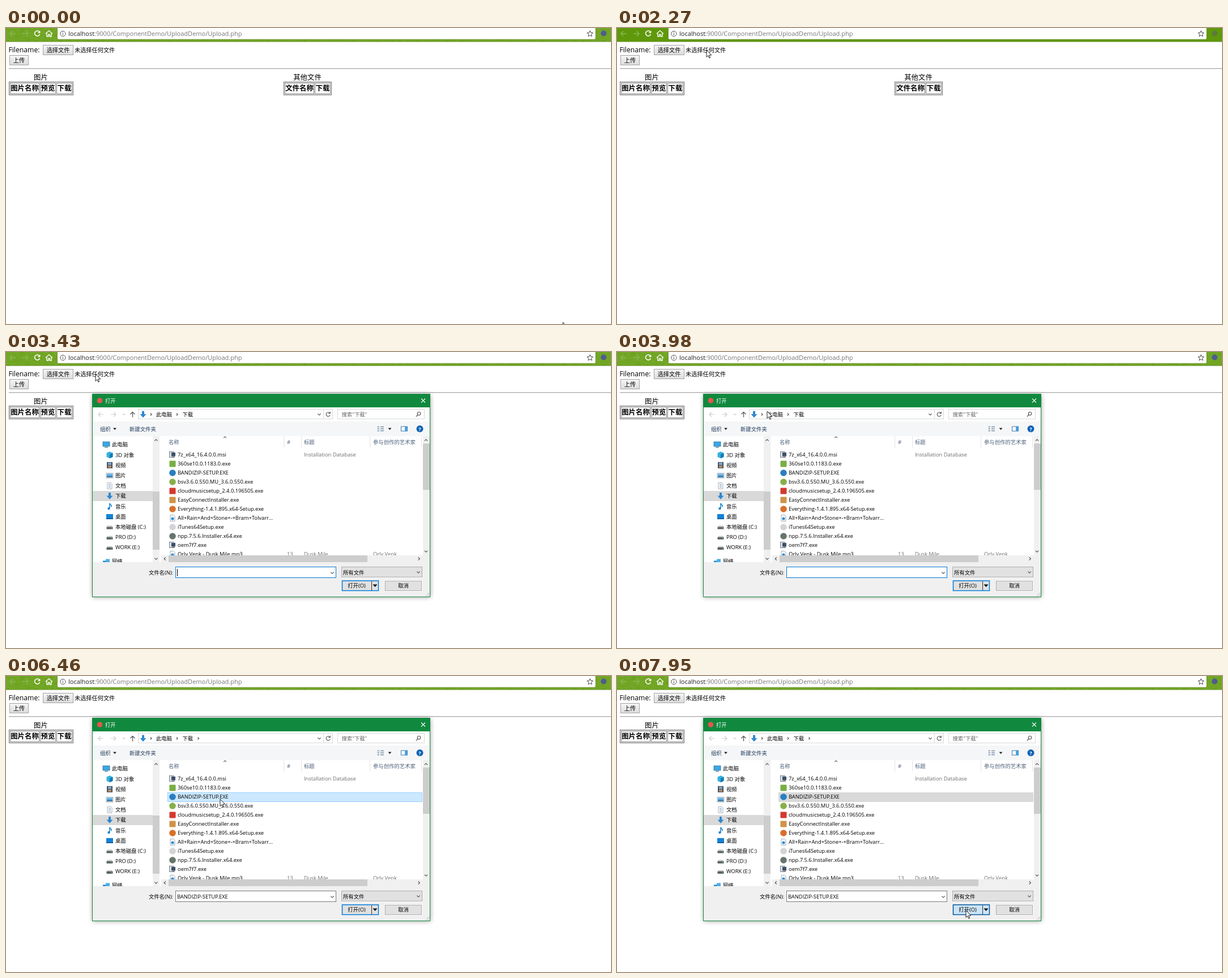
Animation, 1068 px wide and 524 px high, one loop 8000 ms. Source, as an HTML page:

```html
<!DOCTYPE html>
<html lang="zh-CN">
<head>
<meta charset="utf-8">
<title>Upload</title>
<style>
  html, body { margin: 0; width: 100%; height: 100%; overflow: hidden; background: #fff; }
  svg { display: block; width: 1068px; height: 524px; }
  text { font-family: "Open Sans", "Noto Sans CJK SC", "Noto Sans CJK JP", "Noto Sans CJK", sans-serif; white-space: pre; }
</style>
</head>
<body>
<svg viewBox="0 0 1068 524"></svg>
<script>
const LOOP = 8000;
const BLUE = '#0078d7', GREEN = '#10893e', UI = 9.35;

// Markup helpers
const rect = (x, y, w, h, fill, stroke = 'none', more = '') =>
  `<rect x="${x}" y="${y}" width="${w}" height="${h}" fill="${fill}" stroke="${stroke}" ${more}/>`;
const box = (x, y, w, h, fill, stroke, more) => rect(x + .5, y + .5, w - 1, h - 1, fill, stroke, more);
const text = (x, y, s, size = UI, fill = '#000', more = '') =>
  `<text x="${x}" y="${y + size * .36}" font-size="${size}" fill="${fill}" ${more}>${s}</text>`;
const mid = (x, y, s, size, fill, more = '') => text(x, y, s, size, fill, `text-anchor="middle" ${more}`);
const end = (x, y, s, size, fill, more = '') => text(x, y, s, size, fill, `text-anchor="end" ${more}`);
const line = (d, stroke, w = 1, more = '') =>
  `<path d="${d}" fill="none" stroke="${stroke}" stroke-width="${w}" ${more}/>`;
const shape = (d, fill, more = '') => `<path d="${d}" fill="${fill}" ${more}/>`;
const disc = (x, y, r, fill, more = '') => `<circle cx="${x}" cy="${y}" r="${r}" fill="${fill}" ${more}/>`;
const group = (id, body, more = '') => `<g id="${id}" ${more}>${body}</g>`;
const at = (x, y, body) => `<g transform="translate(${x} ${y})">${body}</g>`;
const chevron = (x, y, dir, size = 2.6, color = '#444') =>
  at(x, y, line(`M${-size} ${size / 2}L0 ${-size / 2}L${size} ${size / 2}`, color, 1.1,
    `transform="rotate(${{ up: 0, right: 90, down: 180, left: 270 }[dir]})"`));
const caretDown = (x, y) => shape(`M${x - 3} ${y - 1.5}h6l-3 3.4z`, '#222');

const page = () => `<path d="M-4-5.5H2L4-3.5V5.5H-4Z" fill="#fff" stroke="#8a99a8" stroke-width=".8"/>`;
const icons = {
  pc: rect(-6, -5, 12, 8, '#3ba7e4', '#2b6f9c', 'stroke-width=".8"') + rect(-3, 4, 6, 1.3, '#5a7c92'),
  cube: shape('M0-6L5.5-3.5V3.5L0 6L-5.5 3.5V-3.5Z', '#35b1dc') + shape('M0-1L5.5-3.5V3.5L0 6Z', '#1679b5'),
  film: rect(-5, -5.5, 10, 11, '#45505c') + rect(-3, -4.5, 6, 4, '#7fa8d0') + rect(-3, .5, 6, 4, '#b48a63'),
  picture: rect(-6, -4, 12, 8.5, '#fff', '#8b98a3', 'stroke-width=".8"') + rect(-5, -3, 10, 3.5, '#5fb0e6') + rect(-5, .5, 10, 3, '#3c7fae'),
  page: page() + line('M-2-2.5H2M-2 0H2M-2 2.5H2', '#6b8fb3', .9),
  down: shape('M-2-6H2V-.5H5.5L0 5.8L-5.5-.5H-2Z', '#2f87d0'),
  note: line('M0 3.5V-5.5C1-3 4-3 3 1', '#1c84cf', 1.6) + disc(-1.5, 3.8, 2.2, '#1c84cf'),
  desk: rect(-6, -4.5, 12, 9, '#1683d6') + rect(-6, 3, 12, 1.5, '#0b5796'),
  disk: rect(-5.5, 0, 11, 4, '#5b6065') + shape('M-5.5 0L-4-2H4L5.5 0Z', '#b9bec2') + rect(2.5, 1.5, 1.6, 1.2, '#6ed46a'),
  net: rect(-6, -1.5, 6, 5, '#2487c9') + rect(-1, -4.5, 7, 5.5, '#49aee6'),
  setup: rect(-5.5, -5.5, 7.5, 10, '#d9dee4', '#5e6a77', 'stroke-width=".8"') + rect(-2, -4, 7, 6.5, '#3c4f68') + rect(-1, 3.3, 5, 1.5, '#777'),
  audio: page() + disc(0, 1, 2.6, '#2d8fd5')
};
const icon = (name, x, y) => at(x, y, icons[name]);
const badge = (color, round) => round ? disc(0, 0, 5.8, color) : rect(-5.5, -5.5, 11, 11, color, 'none', 'rx="1"');

// Browser window
function browser() {
  const nav = (x, flip) => line(`M${x - 5} 10H${x + 5}M${x + flip} 5.5L${x + flip * 5} 10L${x + flip} 14.5`, '#8db653', 1.5);
  return rect(0, 0, 1068, 524, '#fff') +
    `<rect id="bar" width="1068" height="24"/>` + rect(0, 0, 1068, 24, '#000', 'none', 'filter="url(#grain)"') +
    line('M0 24.2H1068', '#5c8420', .8) + nav(12, -1) + nav(34, 1) +
    group('reload', line('M59.2 7.2A4.6 4.6 0 1 0 59.6 11', '#fff', 1.6) + shape('M60.4 4.4V9H55.8Z', '#fff')) +
    group('stop', line('M51 6L59 14M59 6L51 14', '#fff', 1.7)) +
    line('M70 10.2L76 4.6L82 10.2M72 9.5V15H74.8V11.5H77.2V15H80V9.5', '#fff', 1.4) +
    rect(90.5, -3, 950.5, 23.2, '#fff', '#5d8a1d', 'rx="2" stroke-width=".8"') +
    line('M105 10A4.6 4.6 0 1 1 104.99 9.8M100.4 9.3V12.6M100.4 7.1V8.3', '#444', 1) +
    text(110, 10, 'localhost<tspan fill="#777">:9000/ComponentDemo/UploadDemo/Upload.php</tspan>', 11, '#222') +
    line('M1031 4.8L1032.5 8.3L1036.2 8.6L1033.4 11.1L1034.2 14.8L1031 12.8L1027.8 14.8L1028.6 11.1L1025.8 8.6L1029.5 8.3Z', '#444', 1) +
    disc(1055, 9.5, 5, '#4f5b93', 'id="ext"');
}

function table(x, widths, labels, title, cx) {
  let left = x + 2, cells = '';
  widths.forEach((w, i) => {
    cells += box(left, 97, w, 20, 'none', '#707070', 'stroke-width=".9"') +
      mid(left + w / 2, 107, labels[i], 12.4, '#000', 'font-weight="700"');
    left += w + 1;
  });
  return mid(cx, 87.5, title, 12.4) + box(x, 95, left + 1 - x, 24, 'none', '#606060', 'stroke-width=".9"') + cells;
}

const pageBody = () => text(4.5, 39, 'Filename:', 12.2) +
  box(65, 30, 54, 18, 'url(#face)', '#a3a3a3', 'id="pick"') + mid(92, 39.5, '选择文件', 10.2) +
  text(121, 39.5, '未选择任何文件', 10.2) +
  box(6, 48, 34, 18, 'url(#face)', '#a3a3a3') + mid(23, 57.3, '上传', 10.2) +
  box(64, 29, 195, 20, 'none', '#e8a33d', 'id="ring"') +
  line('M5 71.8H1068', '#8d8d8d', 1) +
  table(5, [52, 28, 28], ['图片名称', '预览', '下载'], '图片', 61.5) +
  table(490, [52, 28], ['文件名称', '下载'], '其他文件', 532);

// Context menu
function menu() {
  const rows = [
    [127, '返回(B)', 'Alt+向左箭头', 1], [144.3, '前进(F)', 'Alt+向右箭头', 1], [161.5, '重新加载(R)', 'Ctrl+R'],
    [187.5, '另存为(A)...', 'Ctrl+S'], [205, '打印(P)...', 'Ctrl+P'], [222.5, '投射(C)...'], [240, '翻成中文（简体）(T)'],
    [265.5, '保存网页'], [283, 'TidyPane'], [309, '查看网页源代码(V)', 'Ctrl+U'], [326.5, '检查(N)', 'Ctrl+Shift+I']
  ];
  return rect(279, 119, 200.5, 219, '#000', 'none', 'opacity=".5" filter="url(#soft)"') +
    box(275, 115, 203, 222, '#fff', '#b4b4b4') + rect(276, 152, 201, 17.5, '#ebebeb', 'none', 'id="menuHover"') +
    line('M276 173.5H477M276 251.5H477M276 295H477', '#e6e6e6') +
    rows.map(([y, label, key, off], i) => text(302.5, y, label, UI, off ? '#8c8c8c' : '#000') +
      (key ? end(458, y, key, UI, '#929292', i === 2 ? 'id="reloadKey"' : '') : '')).join('') +
    rect(283, 259.5, 12, 12, '#2f8be0', 'none', 'rx="2"') + disc(289, 283, 6, '#c0392b') +
    shape('M468 280L472 283L468 286Z', '#444');
}

// File dialog
const files = [
  ['7z_x64_16.4.0.0.msi', 'setup'], ['360se10.0.1183.0.exe', '#79ad45'], ['BANDIZIP-SETUP.EXE', '#2a7fc0', 1],
  ['bsv3.6.0.550.MU_3.6.0.550.exe', '#86b04a', 1], ['cloudmusicsetup_2.4.0.196505.exe', '#d5392e'],
  ['EasyConnectInstaller.exe', '#cf9347'], ['Everything-1.4.1.895.x64-Setup.exe', '#d8702a', 1],
  ['All+Rain+And+Stone+-+Bram+Tolvarr...', 'audio'], ['iTunes64Setup.exe', '#d4d4d6', 1],
  ['npp.7.5.6.Installer.x64.exe', '#67756c', 1], ['oem7f7.exe', 'setup'], ['Orly Venk - Dusk Mile.mp3', 'audio']
];
const places = [
  ['此电脑', 'pc'], ['3D 对象', 'cube'], ['视频', 'film'], ['图片', 'picture'], ['文档', 'page'], ['下载', 'down'],
  ['音乐', 'note'], ['桌面', 'desk'], ['本地磁盘 (C:)', 'disk'], ['PRO (D:)', 'disk'], ['WORK (E:)', 'disk'], ['网络', 'net']
];
const rowTop = i => 174 + 16 * i;

const frame = () => rect(153, 76, 596, 358, '#000', 'none', 'opacity=".4" filter="url(#blur)"') +
  box(152, 74, 597, 360, '#fff', GREEN) + rect(152, 74, 597, 24, GREEN) +
  disc(165.5, 86, 4.8, '#e2574c') + text(175, 86.3, '打开', UI, '#fff') +
  line('M733 82.5L740 89.5M740 82.5L733 89.5', '#fff', 1.1) +
  rect(153, 372, 595, 61, '#f0f0f0') +
  rect(736, 149, 12, 211, '#f0f0f0') + rect(736, 162, 12, 82, '#cdcdcd') +
  rect(274, 360, 474, 12, '#f0f0f0') + rect(287, 360, 351, 12, '#cdcdcd') +
  rect(299, 380, 284, 20, '#fff') + rect(592, 380, 143, 20, '#fff') +
  rect(593, 404, 66, 20, '#fff') + rect(669, 404, 66, 20, '#fff');

function toolbar() {
  return line('M163 110.5H172M167 106.5L163 110.5L167 114.5M185 110.5H194M190 106.5L194 110.5L190 114.5', '#cfcfcf', 1.2) +
    chevron(208, 110.5, 'down', 2, '#ccc') +
    line('M223.5 115.5V106.5M219.5 110.3L223.5 106.3L227.5 110.3', '#555', 1.3) +
    box(233, 101, 344, 18, '#fff', '#d9d9d9') + line('M560.5 102V118', '#d9d9d9') +
    icon('down', 242, 110.5) + chevron(256, 110.5, 'right', 2) + text(265, 110.5, '此电脑') +
    chevron(302, 110.5, 'right', 2) + text(311.5, 110.5, '下载') +
    group('crumbEnd', chevron(339.5, 110.5, 'right', 2)) + chevron(553, 110.5, 'down') +
    line('M571.5 108A3.6 3.6 0 1 0 572.2 111.5M572.3 105.6V108.6H569.3', '#555', 1.1) +
    box(585, 101, 154, 18, '#fff', '#d9d9d9') + text(592.5, 110.5, '搜索"下载"', UI, '#666') +
    disc(729, 109, 2.8, 'none', 'stroke="#555" stroke-width="1.1"') + line('M727 111.2L723.8 114.4', '#555', 1.3) +
    rect(153, 123, 595, 26, '#f5f6f7') + text(166, 136.3, '组织', UI, '#1e395b') + caretDown(192, 136) +
    text(218, 136.3, '新建文件夹', UI, '#1e395b') +
    line('M655.5 132.5H659M655.5 136H659M655.5 139.5H659M661 132.5H667M661 136H667M661 139.5H667', '#7890a8', 1.6) +
    caretDown(677.5, 136) + rect(697.5, 132, 11, 8, '#fff', '#3b78ad') + rect(704, 132, 4.5, 8, '#4b9fe0') +
    disc(730.5, 136, 6, '#0b62b5') + mid(730.5, 136.2, '?', 9.5, '#fff', 'font-weight="700"');
}

function sidebar() {
  return `<g clip-path="url(#sideClip)">` + rect(153, 246, 106, 18, '#d9d9d9') +
    places.map(([name, kind], i) => {
      const root = i === 0 || i === 11, y = i === 11 ? 371 : 164 + 18.2 * i;
      return icon(kind, root ? 177 : 183, y) + text(root ? 187 : 193, y, name);
    }).join('') + '</g>' +
    rect(259, 149, 12, 223, '#f0f0f0') + rect(259, 247, 12, 103, '#cdcdcd') +
    chevron(265, 156, 'up') + chevron(265, 366, 'down');
}

function list() {
  const head = [[287, '名称'], [496, '#'], [526, '标题'], [648, '参与创作的艺术家']];
  const grey = (x, i, s) => text(x, rowTop(i) + 8, s, UI, '#6d6d6d');
  return line('M490.5 149V169M521.5 149V169M642.5 149V169M733.5 149V169', '#e3e3e3') +
    head.map(([x, s]) => text(x, 159.5, s, UI, '#4c607a')).join('') + chevron(386.5, 151, 'up', 2.4, '#666') +
    `<g clip-path="url(#listClip)">` + rect(285, 174, 450, 16, '#e5f3ff', 'none', 'id="hover"') +
    box(285, rowTop(2), 450, 17, '#cce8ff', '#99d1ff', 'id="picked"') +
    files.map(([name, look, round], i) => {
      const y = rowTop(i) + 8;
      return at(294, y, icons[look] || badge(look, round)) + text(303, y, name);
    }).join('') +
    grey(526, 0, 'Installation Database') + grey(496, 11, '13') + grey(526, 11, 'Dusk Mile') + grey(648, 11, 'Orly Venk') + '</g>' +
    chevron(741.5, 156, 'up') + chevron(741.5, 353, 'down') + chevron(280.5, 366, 'left') + chevron(729, 366, 'right');
}

const footer = () => end(295, 390.5, '文件名(N):') + box(299, 380, 284, 20, '#fff', BLUE, 'id="field"') +
  rect(302, 384, 1, 13, '#000', 'none', 'id="caret"') + text(302, 390.5, files[2][0], UI, '#000', 'id="chosen"') +
  chevron(576, 391, 'down') +
  box(592, 380, 143, 19, '#e1e1e1', '#adadad') + text(595, 390.3, '所有文件') + chevron(728, 390, 'down') +
  rect(593.5, 405, 64, 17.5, '#e1e1e1', BLUE, 'id="open" stroke-width="1.5"') +
  line('M645.5 406V422', '#333', 1) + mid(619, 414, '打开(O)') + shape('M647.5 411.5h8l-4 4.6z', '#000') +
  box(669, 405, 65, 18, '#e1e1e1', '#adadad') + mid(701.5, 414, '取消') +
  line('M746 426V432M743.5 428.5V432M741 431V432', '#bbb', 1.4, 'stroke-dasharray="1.4 1.1"');

const svg = document.querySelector('svg');
svg.innerHTML = `<defs>
  <filter id="grain" x="0" y="0" width="1" height="1"><feTurbulence type="fractalNoise" baseFrequency=".12 .3" numOctaves="3" seed="4"/>
    <feColorMatrix values="0 0 0 0 .12  0 0 0 0 .3  0 0 0 0 0  .9 0 0 0 -.32"/></filter>
  <filter id="blur" x="-.1" y="-.1" width="1.2" height="1.2"><feGaussianBlur stdDeviation="4"/></filter>
  <filter id="soft"><feGaussianBlur stdDeviation=".8"/></filter>
  <linearGradient id="face" x2="0" y2="1"><stop stop-color="#f6f6f6"/><stop offset="1" stop-color="#dcdcdc"/></linearGradient>
  <clipPath id="sideClip">${rect(153, 149, 106, 223, '#000')}</clipPath>
  <clipPath id="listClip">${rect(271, 149, 464.5, 211, '#000')}</clipPath></defs>` +
  browser() + pageBody() + group('menu', menu()) +
  group('dialog', frame() + group('detail', toolbar() + sidebar() + list() + footer())) +
  group('cursor', `<path transform="scale(.78)" d="M0 0V16L3.7 12.5L6.2 18.3L8.6 17.2L6.1 11.5H11.3Z" fill="#fff" stroke="#111" stroke-width="1.2"/>`);

const ui = {};
svg.querySelectorAll('[id]').forEach(el => ui[el.id] = el);
const set = (el, attrs) => { for (const k in attrs) el.setAttribute(k, attrs[k]); };
const show = (el, on) => el.setAttribute('visibility', on ? 'inherit' : 'hidden');

// Pointer legs: start, end, steps, target x, target y
const legs = [
  [70, 670, 9, 275, 115], [745, 820, 2, 288, 131], [890, 1230, 5, 319, 162],
  [1450, 2160, 10, 150, 41], [2270, 2270, 1, 158, 39], [3510, 3980, 7, 265, 105],
  [4090, 4090, 1, 374, 224], [4660, 4660, 1, 377, 217], [4840, 4840, 1, 378, 218],
  [5915, 5915, 1, 379, 214], [6460, 6460, 1, 378, 218],
  [6710, 7470, 11, 578, 385], [7550, 7700, 3, 616, 415]
];
function pointer(t) {
  let x = 983, y = 521;
  for (const [t0, t1, n, tx, ty] of legs) {
    if (t < t0) break;
    const k = n < 2 ? 1 : Math.min(1, (Math.floor((t - t0) / (t1 - t0) * (n - 1) + 1e-6) + 1) / n);
    const e = (1 - Math.cos(Math.PI * k)) / 2;
    x += (tx - x) * e;
    y += (ty - y) * e;
  }
  return [x, y];
}

// Dialog entrance: time, opacity, scale
const entrance = [[0, 0, 1], [3200, .23, .96], [3280, .7, .985], [3350, .95, 1], [3430, 1, 1]];

function render(t) {
  const [x, y] = pointer(t);
  const within = (a, b) => t >= a && t < b;
  set(ui.cursor, { transform: `translate(${x} ${y})` });

  const active = within(745, 2900);
  set(ui.bar, { fill: active ? '#5f990c' : '#74a82a' });
  set(ui.ext, { fill: active ? '#5d7a3c' : '#4f5b93' });
  const loading = within(1450, 2270);
  show(ui.stop, loading);
  show(ui.reload, !loading);
  show(ui.ring, within(2650, 2900));
  set(ui.pick, { fill: within(2650, 2900) ? '#dcdcdc' : 'url(#face)' });

  show(ui.menu, within(745, 1450));
  const onReload = y >= 152;
  show(ui.menuHover, onReload);
  set(ui.reloadKey, { fill: onReload ? '#000' : '#929292' });

  const [, opacity, scale] = entrance.filter(s => t >= s[0]).pop();
  show(ui.dialog, t >= 3200);
  set(ui.dialog, { opacity, transform: `translate(450 253.5) scale(${scale}) translate(-450 -253.5)` });
  show(ui.detail, t >= 3350);
  show(ui.crumbEnd, t >= 4090);

  const row = Math.floor((y - rowTop(0)) / 16), chosen = t >= 5690, pressed = t >= 7880;
  show(ui.hover, t >= 4090 && row >= 0 && y < 360);
  set(ui.hover, { y: rowTop(Math.max(0, row)) });
  show(ui.picked, chosen);
  set(ui.picked, pressed ? { fill: '#d9d9d9', stroke: '#d9d9d9' } : { fill: '#cce8ff', stroke: '#99d1ff' });
  show(ui.chosen, chosen);
  show(ui.caret, within(3350, 3900) || within(4440, 5000) || within(5460, 5690));
  set(ui.field, { stroke: t < 5840 ? BLUE : '#7a7a7a' });

  const over = t >= 4090 && x > 593 && x < 658 && y > 405 && y < 423;
  set(ui.open, { fill: pressed ? '#cce4f7' : over ? '#e5f1fb' : '#e1e1e1', stroke: pressed ? '#005499' : BLUE });
}

const start = performance.now();
(function tick() {
  render((performance.now() - start) % LOOP);
  requestAnimationFrame(tick);
})();
</script>
</body>
</html>
```
